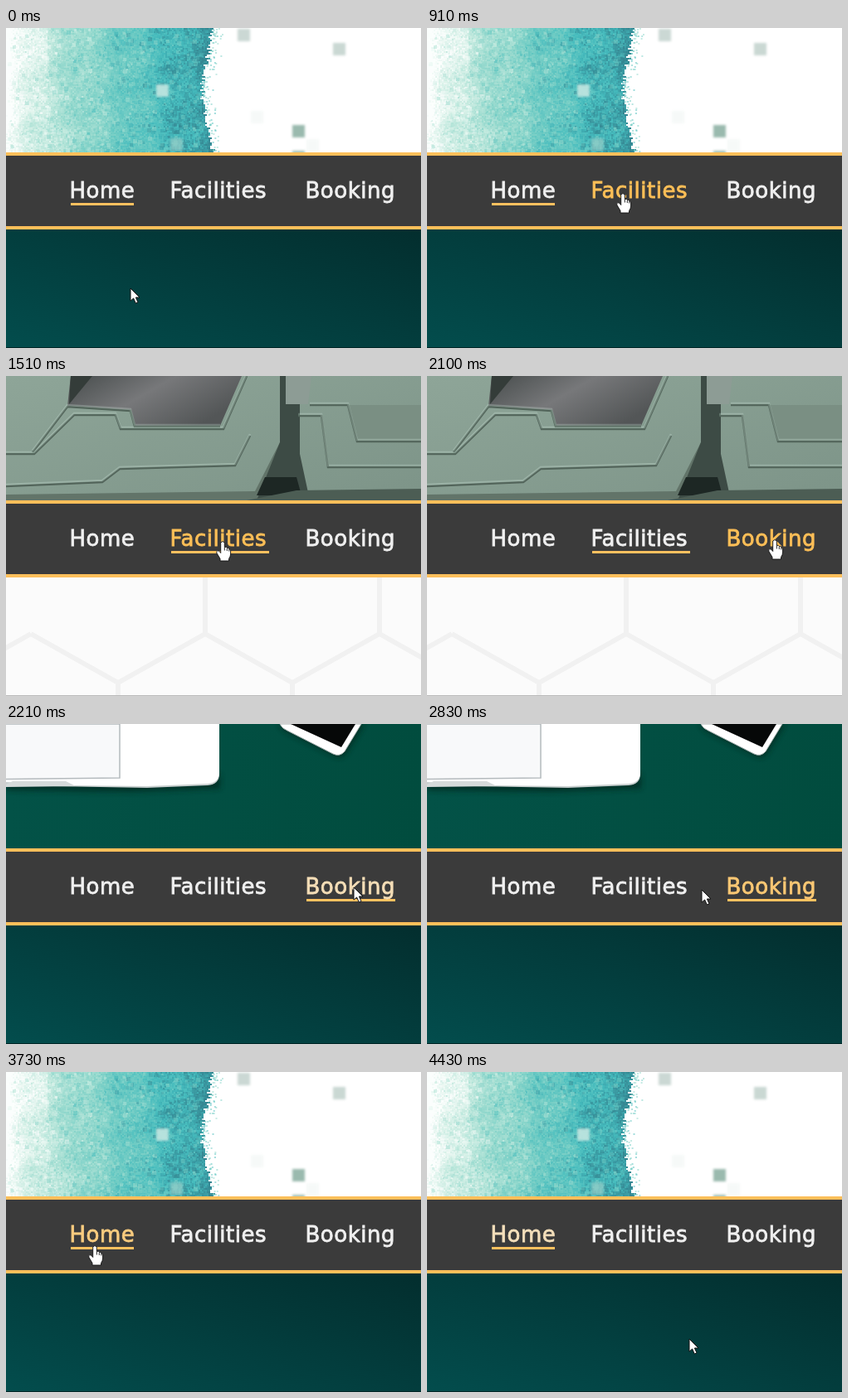
These frames come from a looping animation (500x386 px, 4.53 s). An HTML page with a canvas:

```html
<!DOCTYPE html>
<html lang="en">
<head>
<meta charset="utf-8">
<title>Navigation bar</title>
<style>
html, body { margin: 0; width: 100%; height: 100%; overflow: hidden; background: #fff; }
canvas, svg { position: absolute; left: 0; top: 0; display: block; }
text { font: 26px "DejaVu Sans", Verdana, sans-serif; letter-spacing: .5px; stroke-width: .8px; }
</style>
</head>
<body>
<canvas id="mosaic" width="500" height="150"></canvas>
<svg width="500" height="386" viewBox="0 0 500 386">
  <defs>
    <linearGradient id="deep" x1="0" y1="1" x2="1" y2="0">
      <stop offset="0" stop-color="#034d4d"/><stop offset="1" stop-color="#032e2e"/>
    </linearGradient>
    <linearGradient id="window" x1="0" y1="0" x2="1" y2=".5">
      <stop offset="0" stop-color="#474c4c"/><stop offset=".5" stop-color="#77787a"/><stop offset="1" stop-color="#535657"/>
    </linearGradient>
    <linearGradient id="panel" x1="0" y1="0" x2="1" y2="1">
      <stop offset="0" stop-color="#8ea598"/><stop offset="1" stop-color="#7d9488"/>
    </linearGradient>
    <linearGradient id="desk">
      <stop offset="0" stop-color="#035247"/><stop offset="1" stop-color="#014c3e"/>
    </linearGradient>
    <filter id="soft" x="-20%" y="-40%" width="140%" height="180%"><feGaussianBlur stdDeviation="3"/></filter>
    <clipPath id="top"><rect width="500" height="150"/></clipPath>
  </defs>

  <rect y="243" width="500" height="143" fill="url(#deep)"/>
  <path d="M0 385.5H500" stroke="#012626"/>

  <g id="facilities">
    <g clip-path="url(#top)">
      <rect width="500" height="150" fill="url(#panel)"/>
      <path d="M78 0H284L258 60H155L150 41L74 36Z" fill="url(#window)"/>
      <path d="M78 0H104L76 34Z" fill="#343c39"/>
      <path d="M0 143L300 139L330 80V150H0Z" fill="#627469"/>
      <path d="M330 0H354V94L366 150H302L330 80Z" fill="#3d4b45"/>
      <path d="M337 0H368L364 34H337Z" fill="#8d9c95"/>
      <path d="M312 122H350L356 144H302Z" fill="#1d2724"/>
      <path d="M412 35H500V79H425Z" fill="#7a8f83"/>
      <path d="M350 138L500 136V150H290Z" fill="#4c5d54"/>
      <g id="grooves" fill="none" stroke="#52645a" stroke-width="2.5">
        <path d="M32 92L74 37L150 42L155 61H258"/>
        <path d="M0 94H34L82 47H132L138 64H262L290 0"/>
        <path d="M0 133L116 128L137 112L276 108L294 72"/>
        <path d="M366 35H412L423 79H500"/>
        <path d="M352 48H380L388 110H500"/>
      </g>
      <use href="#grooves" y="-2" style="mix-blend-mode:screen" opacity=".55"/>
    </g>
    <rect y="243" width="500" height="143" fill="#fbfbfb"/>
    <path id="hex" fill="none" stroke="#f1f1f1" stroke-width="6"/>
    <path d="M0 385.5H500" stroke="#b9b9b9"/>
  </g>

  <g id="booking" clip-path="url(#top)">
    <rect width="500" height="150" fill="url(#desk)"/>
    <path d="M0 60H258V78L150 82L0 80Z" fill="#00251f" opacity=".7" filter="url(#soft)"/>
    <path d="M0 0H257V60Q257 73 243 74L170 77L0 74Z" fill="#c9cfcf"/>
    <path d="M0 0H257V58Q257 71 243 72L170 75L74 74L0 70Z" fill="#fff"/>
    <path d="M0 0H137V65L0 66.5" fill="#f8f9fa" stroke="#b4babd" stroke-width="1.5"/>
    <path d="M0 73L8 69H72L84 75L0 76Z" fill="#d5dada"/>
    <path d="M328 0L336 9L398 40Q406 42 411 34L432 0Z" fill="#00251f" opacity=".7" filter="url(#soft)"/>
    <path d="M330 0Q332 5 339 8L394 36Q402 40 408 33L428 0Z" fill="#fff" stroke="#aab3b2"/>
    <path d="M343 0L404 28L421 0Z" fill="#060808"/>
  </g>

  <rect y="150" width="500" height="93" fill="#fdbf5a"/>
  <rect y="154" width="500" height="85" fill="#3b3b3b"/>
  <rect id="line" y="211" height="3" fill="#fdc15f"/>
  <g id="menu"></g>

  <path id="arrow" d="M0 0V15.2L3.6 12L6.3 18L9 16.8L6.4 11H11Z" fill="#fff" stroke="#111"/>
  <g id="hand" fill="#fff" stroke="#111" stroke-width=".9" stroke-linejoin="round">
    <path d="M-2.3 2Q0 -1 2.3 2V7.5Q4.5 6.5 5.3 8.5Q7.2 7.5 7.8 9.7Q9.6 9.5 9.6 12V16Q9.4 19 7.5 21.5V24H-3V21.5Q-5 18 -7 14.8Q-8 12.4 -6 11.6Q-4 11.6 -2.3 14.5Z"/>
    <path d="M2.3 8V11.5M5.3 9V12M7.8 10V12.5" fill="none"/>
  </g>
</svg>
<script>
const LOOP = 4530, STEP = LOOP / 45, FADE = 320;
const $ = id => document.getElementById(id);
const show = (id, on) => $(id).style.display = on ? "" : "none";
const mix = (a, b, p) => a + (b - a) * p;
const ease = p => (p + p * p * (3 - 2 * p)) / 2;

const links = [
  { label: "Home", x: 78, w: 76 },
  { label: "Facilities", x: 199, w: 118 },
  { label: "Booking", x: 362, w: 107 }
];
for (const link of links) {
  link.el = document.createElementNS("http://www.w3.org/2000/svg", "text");
  link.el.textContent = link.label;
  link.el.setAttribute("x", link.x - 1.5);
  link.el.setAttribute("y", 205);
  $("menu").append(link.el);
}

const moves = [
  { from: 0, to: 580, x: 236, y: 199 },
  { from: 1400, to: 2000, x: 419, y: 197 },
  { from: 2630, to: 3220, x: 107, y: 209 },
  { from: 4200, to: 4430, x: 316, y: 322 }
];
const loads = [{ at: 0, page: 0 }, { at: 1110, page: 1 }, { at: 2210, page: 2 }, { at: 3540, page: 0 }];

function pointer(t) {
  let x = 150, y = 314;
  for (const m of moves) {
    const p = ease(Math.max(0, Math.min(1, (t - m.from) / (m.to - m.from))));
    x = mix(x, m.x, p);
    y = mix(y, m.y, p);
  }
  return { x, y };
}

function isOver(link, t) {
  const { x, y } = pointer(t);
  return y > 182 && y < 216 && x >= link.x && x <= link.x + link.w;
}

// share of the last FADE ms spent on the link; a page load resets most of it
function glow(link, t, loaded) {
  const n = 32;
  let sum = 0;
  for (let i = 0; i < n; i++) {
    const s = t - i * FADE / n;
    if (isOver(link, s)) sum += s < loaded ? .35 : 1;
  }
  return sum / n;
}

function draw(now) {
  const time = now % LOOP;
  const t = Math.floor((time + 15) / STEP) * STEP;
  const { at, page } = loads.filter(l => l.at <= time).pop();
  show("facilities", page === 1);
  show("booking", page === 2);
  $("line").setAttribute("x", links[page].x);
  $("line").setAttribute("width", links[page].w);
  for (const link of links) {
    const g = glow(link, t, at);
    link.el.style.fill = link.el.style.stroke =
      `rgb(${mix(240, 253, g)}, ${mix(240, 191, g)}, ${mix(240, 87, g)})`;
  }
  const { x, y } = pointer(t);
  const waiting = page === 2 && time - at < 200;
  const over = !waiting && links.some(l => isOver(l, t));
  show("hand", over);
  show("arrow", !over);
  for (const id of ["arrow", "hand"])
    $(id).setAttribute("transform", `translate(${Math.round(x)} ${Math.round(y)})`);
}

function drawHex() {
  let d = "";
  for (let i = -1; i < 6; i++) {
    const x = 30 + 105 * i, up = i % 2 === 0;
    d += `M${x} ${up ? 311 : 370}L${x + 105} ${up ? 370 : 311}`;
    if (i) d += up ? `M${x} 243V311` : `M${x} 370V386`;
  }
  $("hex").setAttribute("d", d);
}

function paintMosaic() {
  const g = $("mosaic").getContext("2d");
  let seed = 11;
  const rnd = () => (seed = (seed * 16807) % 2147483647) / 2147483647;
  const shade = f => {
    f = Math.max(0, Math.min(1, f));
    return `hsl(${156 + 31 * f}, 47%, ${99 - 60 * f}%)`;
  };
  const edge = y => 243 + 6 * Math.cos(y / 24);
  // left to right from white to teal, with soft patches
  const tone = (x, y) => .95 * Math.pow(x / 245, .75)
    + .06 * Math.sin(x / 13 + y / 21) * Math.cos(y / 17 - x / 30)
    - (x < 50 ? .12 * (1 - y / 150) : 0);

  g.fillStyle = "#fff";
  g.fillRect(0, 0, 500, 150);
  for (let y = 0; y < 150; y += 2)
    for (let x = 0; x < edge(y) + rnd() * 8 - 5; x += 2) {
      g.fillStyle = shade(tone(x, y) + (rnd() - .5) * .14);
      g.fillRect(x, y, 2, 2);
    }
  for (let i = 0; i < 1500; i++) {
    const x = Math.floor(rnd() * 236), y = Math.floor(rnd() * 150), s = 2 + Math.floor(rnd() * 4);
    g.globalAlpha = .3 + rnd() * .3;
    g.fillStyle = shade(tone(x, y) + (rnd() - .5) * .6);
    g.fillRect(x, y, s, s);
  }
  for (let i = 0; i < 110; i++) {
    const y = Math.floor(rnd() * 150);
    g.fillStyle = shade(.4 + rnd() * .4);
    g.fillRect(edge(y) + rnd() * rnd() * 16, y, 2, 2);
  }

  // loose blurred blocks
  g.filter = "blur(1.6px)";
  const block = (x, y, color, alpha) => {
    g.globalAlpha = alpha;
    g.fillStyle = color;
    g.fillRect(x - 7, y - 7, 15, 15);
  };
  block(286, 8, "#a9bfb7", .6);
  block(401, 25, "#b4c8c1", .7);
  block(352, 124, "#8fb3a6", .9);
  block(352, 155, "#8fb3a6", .8);
  block(302, 107, "#eef3f1", .5);
  block(369, 141, "#eef3f1", .5);
  block(188, 75, "#c3e6e0", .9);
  block(205, 140, "#8ccbc6", .8);
}

drawHex();
paintMosaic();
const begin = performance.now();
function frame() {
  draw(performance.now() - begin);
  requestAnimationFrame(frame);
}
frame();
</script>
</body>
</html>
```
